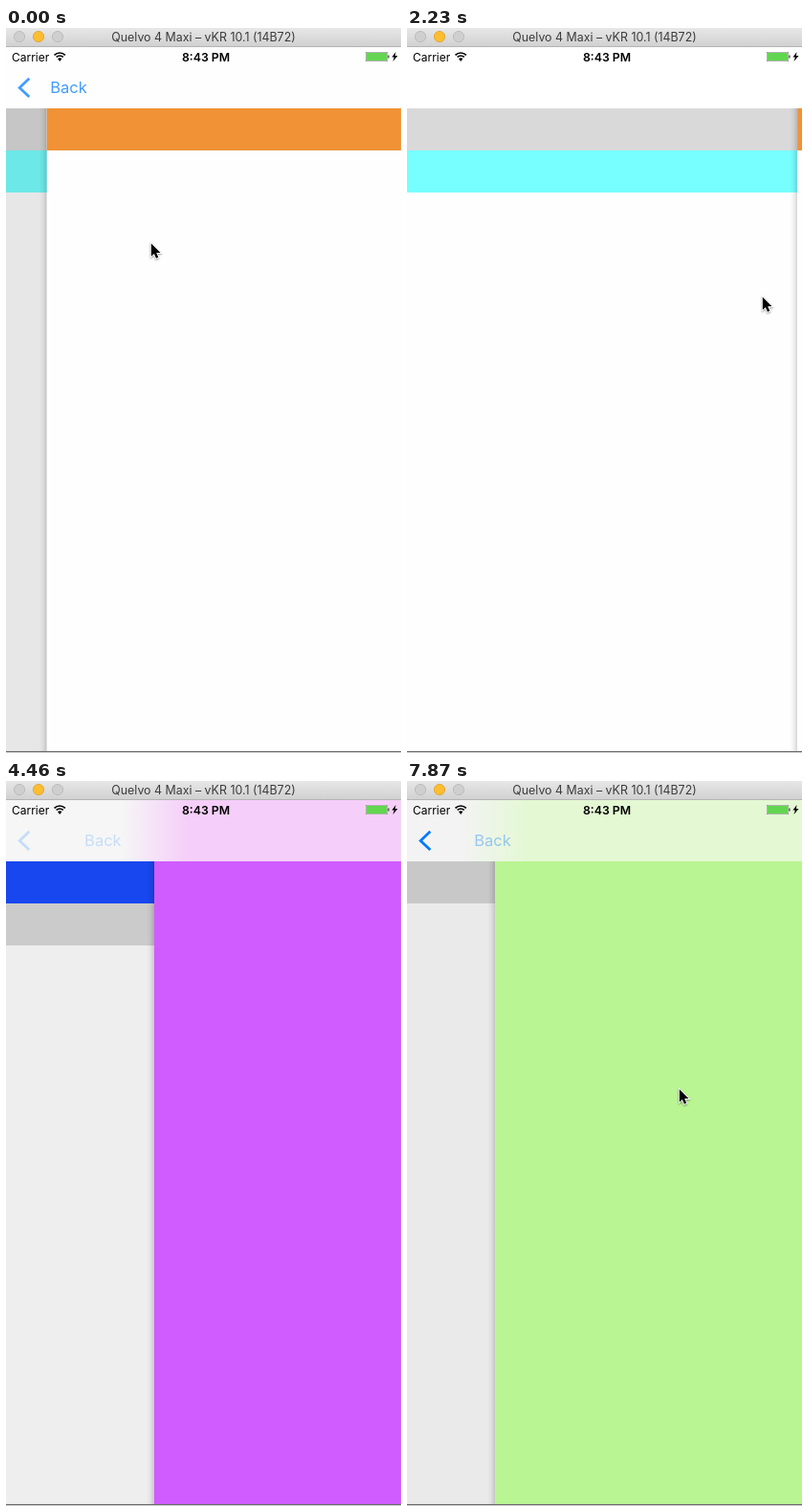
An HTML page with a canvas for the animation above (8000 ms loop, 413 px wide and 758 px high).

```html
<!DOCTYPE html>
<html lang="en">
<head>
<meta charset="utf-8">
<title>Swipe navigation</title>
<style>
  html, body { margin: 0; width: 100%; height: 100%; overflow: hidden; background: #fefefe; }
  canvas { display: block; width: 413px; height: 758px; }
</style>
</head>
<body>
<canvas id="stage"></canvas>
<script>
const W = 413, H = 758, LOOP = 8000, TICK = 148.5, LAST_TICK = 53;
const NAV_TOP = 20, NAV_BOTTOM = 84, ROW = 44, FLOOR = 756, GONE = Infinity;
const WHITE = '#fefefe', GRAY = '#d9d9d9', BLUE = '#1a4cff', CYAN = '#77ffff',
      ORANGE = '#f09235', TINT_BLUE = '#007aff';

// Each page knows the rows of the list beneath it while it is open.
const orange = { fill: WHITE, tint: WHITE, rows: [ORANGE], under: [GRAY, CYAN], textShift: 0.32 };
const purple = { fill: '#d05cff', tint: '#f5cff9', rows: [], under: [BLUE, GRAY], textShift: 0.32 };
const green = { fill: '#b9f592', tint: '#e4f8d4', rows: [], under: [GRAY], textShift: 0.41, nested: true };

// Left edge of a page that slides in and settles exponentially.
const push = start => tick => {
  const edge = W * 0.21 ** (tick - start);
  return edge < 1 ? 0 : edge;
};
// Left edge of a page dragged at a steady rate, then let go.
const swipe = (start, rate, release = GONE) => tick => {
  const held = Math.max(0, rate * (Math.min(tick, release) - start));
  if (tick <= release) return held;
  const edge = W - (W - held) * 0.25 ** (tick - release);
  return edge > W - 4.5 ? GONE : edge;
};

const STEPS = [
  { at: 0, page: orange, edge: swipe(-2.5, 17.1, 12.5) },
  { at: 20, page: purple, edge: push(20), pushing: true },
  { at: 25, page: purple, edge: swipe(25, 31, 30) },
  { at: 38, page: orange, edge: push(37.63), pushing: true },
  { at: 44, page: green, edge: push(43.535), pushing: true },
  { at: 48, page: green, edge: swipe(49.46, 26) },
];
const POINTER_START = { x: 151, y: 224 };
const POINTER_MOVES = [
  { end: 13, ticks: 13, x: 371, y: 280 },
  { end: 18, ticks: 3, x: 303, y: 145 },
  { end: 33, ticks: 3, x: 382, y: 224 },
  { end: 36, ticks: 3, x: 346, y: 116 },
  { end: 42, ticks: 2, x: 270, y: 122 },
  { end: 49, ticks: 2, x: 192, y: 310 },
  { end: 53, ticks: 4, x: 284, y: 321 },
];

const canvas = document.getElementById('stage');
const ctx = canvas.getContext('2d');
const scale = window.devicePixelRatio || 1;
canvas.width = W * scale;
canvas.height = H * scale;

const clamp01 = v => Math.min(1, Math.max(0, v));

function rect(color, x, y, w, h) {
  ctx.fillStyle = color;
  ctx.fillRect(x, y, w, h);
}

function shape(path, color = '#000') {
  ctx.fillStyle = color;
  ctx.fill(new Path2D(path));
}

function text(str, x, y, size, color, align = 'left', weight = 400) {
  ctx.font = `${weight} ${size}px Inter, Roboto, sans-serif`;
  ctx.textAlign = align;
  ctx.fillStyle = color;
  ctx.fillText(str, x, y);
}

function ramp(x0, y0, x1, y1, ...colors) {
  const g = ctx.createLinearGradient(x0, y0, x1, y1);
  colors.forEach((c, i) => g.addColorStop(i / (colors.length - 1), c));
  return g;
}

function drawPage(x, fill, rows) {
  rect(fill, x, NAV_BOTTOM, W - x, FLOOR - NAV_BOTTOM);
  rows.forEach((color, i) => rect(color, x, NAV_BOTTOM + i * ROW, W - x, ROW));
}

function drawUpperPage({ page, pushing }, edge) {
  const progress = edge / W, height = FLOOR - NAV_BOTTOM;
  rect(`rgba(0,0,0,${0.1 * (1 - progress)})`, 0, NAV_BOTTOM, edge, height);
  const depth = 0.16 * (pushing ? progress : 1);
  const shadow = [0, 0.3, 1].map(k => `rgba(0,0,0,${k * depth})`);
  rect(ramp(edge - 8, 0, edge, 0, ...shadow), edge - 8, NAV_BOTTOM, 8, height);
  drawPage(edge, page.fill, page.rows);
}

function navBackground(tint, edge) {
  const gray = Math.round(254 - 25 * (1 - edge / W) + (tint === WHITE ? 1 : 8));
  const dim = `rgb(${gray},${gray},${gray})`;
  if (tint === WHITE) return edge > 60 ? ramp(edge + 3, 0, edge + 11, 0, dim, WHITE) : WHITE;
  return edge > 0 ? ramp(edge - 34, 0, edge + 34, 0, dim, tint) : tint;
}

function drawNavBar({ page, pushing }, edge) {
  rect(navBackground(page.tint, edge), 0, NAV_TOP, W, NAV_BOTTOM - NAV_TOP);
  const fade = Math.max(0, 1 - 1.7 * edge / W) ** (page.nested ? 2.1 : 1.6);
  const alpha = Math.min(1, pushing ? fade * 1.5 : fade);
  ctx.globalAlpha = page.nested ? 1 : alpha;
  ctx.strokeStyle = TINT_BLUE;
  ctx.lineWidth = 2.8;
  ctx.stroke(new Path2D('M24.3 52.8L14.2 62.4L24.3 72'));
  ctx.globalAlpha = alpha;
  text('Back', 32.5 + edge * page.textShift, 68, 16.5, TINT_BLUE);
  ctx.globalAlpha = 1;
}

function drawTitleBar() {
  rect(ramp(0, 0, 0, 19, '#e7e7e7', '#d1d1d1'), 0, 0, W, 19);
  rect('#b4b4b4', 0, 19, W, 1);
  ['#cfcfcf', '#fdbd30', '#cfcfcf'].forEach((color, i) => {
    ctx.beginPath();
    ctx.arc(14 + 20 * i, 9, 5.6, 0, 7);
    ctx.fillStyle = color;
    ctx.fill();
    ctx.strokeStyle = i === 1 ? '#dfa023' : '#b5b5b5';
    ctx.lineWidth = 0.8;
    ctx.stroke();
  });
  text('Quelvo 4 Maxi – vKR 10.1 (14B72)', 206.5, 14, 12.4, '#3c3c3c', 'center');
}

function drawStatusBar() {
  text('Carrier', 6, 35, 12, '#000');
  text('8:43 PM', 209, 35, 12.3, '#000', 'center', 600);
  ctx.strokeStyle = '#000';
  ctx.lineWidth = 1.7;
  [8, 5].forEach(r => {
    ctx.beginPath();
    ctx.arc(56.2, 34, r, -Math.PI * 0.75, -Math.PI * 0.25);
    ctx.stroke();
  });
  shape('M56.2 35l-2.2-3q2.2-1.6 4.4 0z');
  rect('#777', 376, 25, 23, 10);
  rect('#e6f6e2', 376.5, 25.5, 22, 9);
  rect('#62d650', 377, 26, 21, 8);
  rect('#333', 399.3, 28.5, 1.2, 3);
  shape('M407.5 25l-4 5.6h2.4l-1.4 4.4 5-6h-2.6z');
}

function drawPointer(tick) {
  let { x, y } = POINTER_START;
  for (const move of POINTER_MOVES) {
    const part = clamp01((tick - move.end) / move.ticks + 1);
    x += (move.x - x) * part;
    y += (move.y - y) * part;
  }
  const arrow = 'M0 0V13.6L3.1 10.7 5.2 15.6 7.5 14.6 5.4 9.8H9.7Z';
  ctx.save();
  ctx.translate(x + 0.8, y + 1.2);
  ctx.shadowColor = 'rgba(0,0,0,.4)';
  ctx.shadowBlur = 2 * scale;
  ctx.shadowOffsetY = scale;
  ctx.strokeStyle = '#fff';
  ctx.lineWidth = 1.8;
  ctx.stroke(new Path2D(arrow));
  ctx.shadowColor = 'transparent';
  shape(arrow);
  ctx.restore();
}

function draw(time) {
  const tick = Math.min(LAST_TICK, Math.floor((time % LOOP) / TICK + 0.07));
  const step = STEPS.findLast(s => s.at <= tick);
  const edge = step.edge(tick);
  const open = edge !== GONE;
  ctx.setTransform(scale, 0, 0, scale, 0, 0);
  rect(WHITE, 0, 0, W, H);
  drawPage(0, WHITE, open ? step.page.under : [BLUE, CYAN]);
  if (open) {
    drawUpperPage(step, edge);
    drawNavBar(step, edge);
  }
  drawTitleBar();
  drawStatusBar();
  rect('#6a6a6a', 0, FLOOR, W, 1);
  rect('#cfcfcf', 0, FLOOR + 1, W, 1);
  const pointerHidden = tick > 25 && tick < 32;
  if (!pointerHidden) drawPointer(tick);
}

const start = performance.now();
function loop() {
  draw(performance.now() - start);
  requestAnimationFrame(loop);
}
loop();
</script>
</body>
</html>
```
